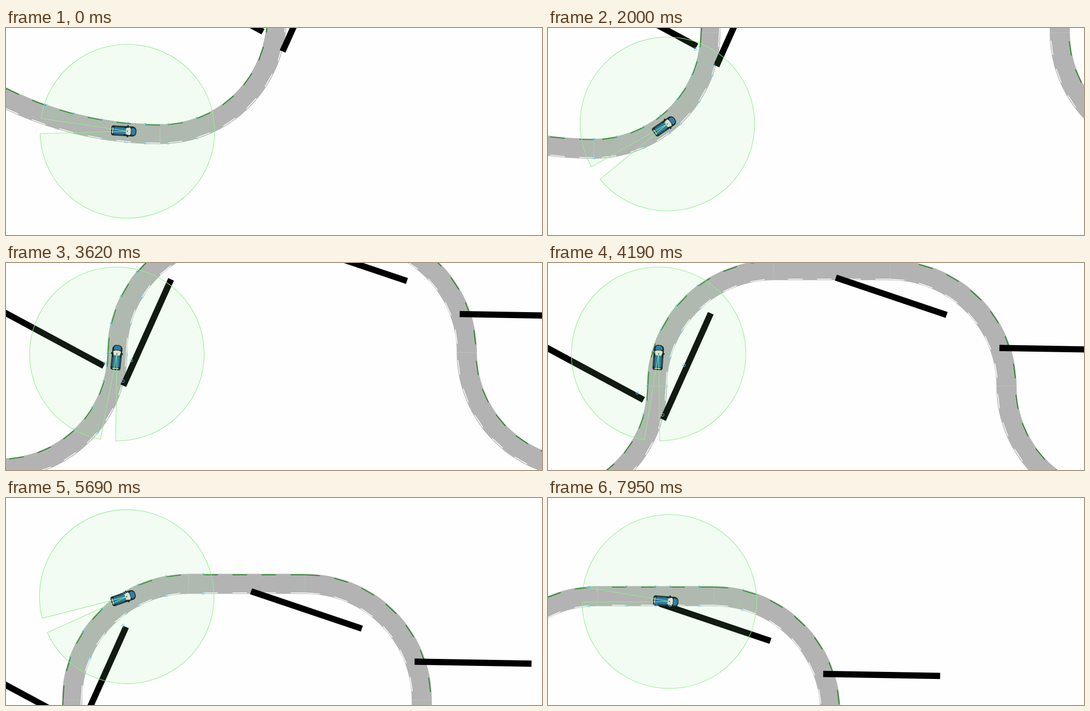
An HTML page with a canvas that plays this animation: 1065x413 px, repeating every 8080 ms.

```html
<!DOCTYPE html>
<html lang="en">
<head>
<meta charset="utf-8">
<title>Car sensor simulation</title>
<style>
html, body { margin: 0; width: 100%; height: 100%; overflow: hidden; background: #fefefe; }
canvas { display: block; }
</style>
</head>
<body>
<canvas id="stage" width="1065" height="413"></canvas>
<script>
const ctx = document.getElementById('stage').getContext('2d');
const LOOP = 8080, STEPS = 57, STEP_MS = 134.2;
const TILE = 231.5, DASH = TILE / 8, LANE = 18, HALF_ROAD = 20;
const PIVOT = { x: 218, y: 204.6 }, SENSOR = 23.2, RANGE = 173.5, BLIND = 5;

const rad = d => d * Math.PI / 180;
const polar = (x, y, r, a) => [x + r * Math.cos(a), y + r * Math.sin(a)];
const dist = (p, q) => Math.hypot(p[0] - q[0], p[1] - q[1]);

// The road is a chain of pieces: turn in degrees (right is positive) and size in tiles.
function buildRoad(x, y, heading, pieces) {
  return pieces.map(([turn, size]) => {
    const h = heading, k = Math.sign(turn), r = size * TILE, start = [x, y];
    const centre = polar(x, y, r * k, h + Math.PI / 2), from = h - k * Math.PI / 2;
    // point at share u of the piece, shifted to the left by off
    const at = (u, off) => k
      ? polar(...centre, r + k * off, from + rad(turn) * u)
      : polar(...polar(...start, r * u, h), off, h - Math.PI / 2);
    const length = off => k ? Math.abs(rad(turn)) * (r + k * off) : r;
    [x, y] = at(1, 0);
    heading += rad(turn);
    return { k, at, length };
  });
}
const road = buildRoad(...polar(-100, 634 - 3 * TILE, 3 * TILE, rad(140)), rad(50),
  [[-50, 3], [-90, 1], [90, 1], [0, 1], [90, 1], [-90, 1]]);

// Dashes run forward on right turns and backward elsewhere.
const dashes = [];
for (const { k, at, length } of road)
  for (const off of [LANE, -LANE]) {
    const len = length(off), point = s => at(k > 0 ? s / len : 1 - s / len, off);
    for (let s = 0; s < len - 8; s += 2 * DASH)
      dashes.push({ a: point(s), b: point(s + DASH), left: off > 0, sensed: k <= 0 || s > 0 });
  }

// walls: centre and angle, all of one size
const walls = [[928, 328.2, 1], [597, 223, 18.7], [191, 363, 114.1], [2.5, 374.4, 28.4]]
  .map(([x, y, angle]) => [[1, 1], [-1, 1], [-1, -1], [1, -1]].map(([u, v]) =>
    polar(...polar(x, y, u * 116.2, rad(angle)), v * 6.2, rad(angle + 90))));

// key points of the drive: step, position of the rear axle, heading
const route = [
  [0, -188, 626.9, 3.4], [13, 27, 597.8, -34.5], [20, 107, 508.8, -62.7],
  [29, 133, 361.3, -85.7], [40, 218, 204.3, -19.4], [49, 363, 168.3, 3.4], [STEPS, 483, 179.8, 4.7]
];

// The first picture rests, then the drive advances in even steps.
const stepAt = t => t < 440 ? 0 : Math.min(STEPS, 1 + Math.floor((t - 385) / STEP_MS));

// Hermite path; the car points along its direction of travel.
function poseAt(step) {
  let n = 0;
  while (n < route.length - 2 && step >= route[n + 1][0]) n++;
  const [i, x1, y1, h1] = route[n], [j, x2, y2, h2] = route[n + 1];
  const u = (step - i) / (j - i), m = 1.04 * Math.hypot(x2 - x1, y2 - y1);
  const curve = (p, q, v, w) => {
    const b = 3 * (q - p) - 2 * v - w, c = 2 * (p - q) + v + w;
    return [p + u * (v + u * (b + u * c)), v + u * (2 * b + 3 * u * c)];
  };
  const [x, dx] = curve(x1, x2, m * Math.cos(rad(h1)), m * Math.cos(rad(h2)));
  const [y, dy] = curve(y1, y2, m * Math.sin(rad(h1)), m * Math.sin(rad(h2)));
  return { x, y, h: Math.atan2(dy, dx) };
}

function line(points, color, width) {
  ctx.strokeStyle = color;
  ctx.lineWidth = width;
  ctx.beginPath();
  points.forEach(p => ctx.lineTo(...p));
  ctx.stroke();
}

function shape(points, color) {
  ctx.fillStyle = color;
  ctx.beginPath();
  points.forEach(p => ctx.lineTo(...p));
  ctx.fill();
}

function box(x, y, w, h, r, color) {
  ctx.fillStyle = color;
  ctx.beginPath();
  ctx.roundRect(x, y, w, h, r);
  ctx.fill();
}

function drawRoad() {
  for (const { at } of road)
    line(Array.from({ length: 61 }, (_, i) => at(i / 60, 0)), '#b3b3b3', 2 * HALF_ROAD);
  for (const { at } of road)
    line([at(0, HALF_ROAD), at(0, -HALF_ROAD)], '#bebebe', 1);
  for (const d of dashes)
    line([d.a, d.b], d.left ? '#128212' : '#fff', 1.6);
}

// origin at the sensor, facing right
function drawCar() {
  const ink = '#0b1418', blue = '#2470a6';
  box(-1, -12, 3.5, 24, 1.5, ink);
  box(-32, -10, 50, 20, [4, 8, 8, 4], ink);
  box(-27, -6.5, 24, 13, 2, blue);
  for (const y of [-8, 8]) line([[-25, y], [-7, y]], '#3d6f8f', 0.8);
  line([[-29, -6], [-29, 6]], '#e8f2f2', 1.8);
  shape([[-3, -6], [5, -8], [7, -4], [7, 4], [5, 8], [-3, 6]], '#e0dedb');
  box(8, -7, 8.5, 14, [1, 5, 5, 1], blue);
}

function drawSensor() {
  ctx.beginPath();
  ctx.moveTo(0, 0);
  ctx.arc(0, 0, RANGE, rad(BLIND - 180), rad(180 - BLIND));
  ctx.closePath();
  ctx.fillStyle = 'rgba(144,238,144,.11)';
  ctx.fill();
  ctx.strokeStyle = '#90ee90';
  ctx.lineWidth = 1.1;
  ctx.stroke();
  box(-1, -1, 2, 2, 1, '#123a12');
}

function nearest(p, a, b) {
  const dx = b[0] - a[0], dy = b[1] - a[1];
  const u = ((p[0] - a[0]) * dx + (p[1] - a[1]) * dy) / (dx * dx + dy * dy);
  const k = Math.min(1, Math.max(0, u));
  return [a[0] + k * dx, a[1] + k * dy];
}

// the nearest point of every dash and wall in view
function drawHits(s, h) {
  const hits = dashes.filter(d => d.sensed).map(d => nearest(s, d.a, d.b));
  for (const w of walls)
    hits.push(w.map((p, i) => nearest(s, p, w[(i + 1) % 4]))
      .reduce((p, q) => dist(s, p) < dist(s, q) ? p : q));
  ctx.strokeStyle = '#7cc8ea';
  ctx.lineWidth = 1;
  for (const p of hits) {
    const a = Math.atan2(p[1] - s[1], p[0] - s[0]) - h;
    if (dist(s, p) > RANGE || Math.cos(a) < -Math.cos(rad(BLIND))) continue;
    ctx.beginPath();
    ctx.arc(...p, 2.8, 0, 7);
    ctx.stroke();
  }
}

function draw(t) {
  const { x, y, h } = poseAt(stepAt(t)), sensor = polar(x, y, SENSOR, h);
  ctx.setTransform(1, 0, 0, 1, 0, 0);
  ctx.fillStyle = '#fefefe';
  ctx.fillRect(0, 0, 1065, 413);
  ctx.translate(PIVOT.x - x, PIVOT.y - y);
  drawRoad();
  walls.forEach(w => shape(w, '#000'));
  ctx.save();
  ctx.translate(...sensor);
  ctx.rotate(h);
  drawCar();
  drawSensor();
  ctx.restore();
  drawHits(sensor, h);
}

const start = performance.now();
function tick() {
  draw((performance.now() - start) % LOOP);
  requestAnimationFrame(tick);
}
tick();
</script>
</body>
</html>
```
